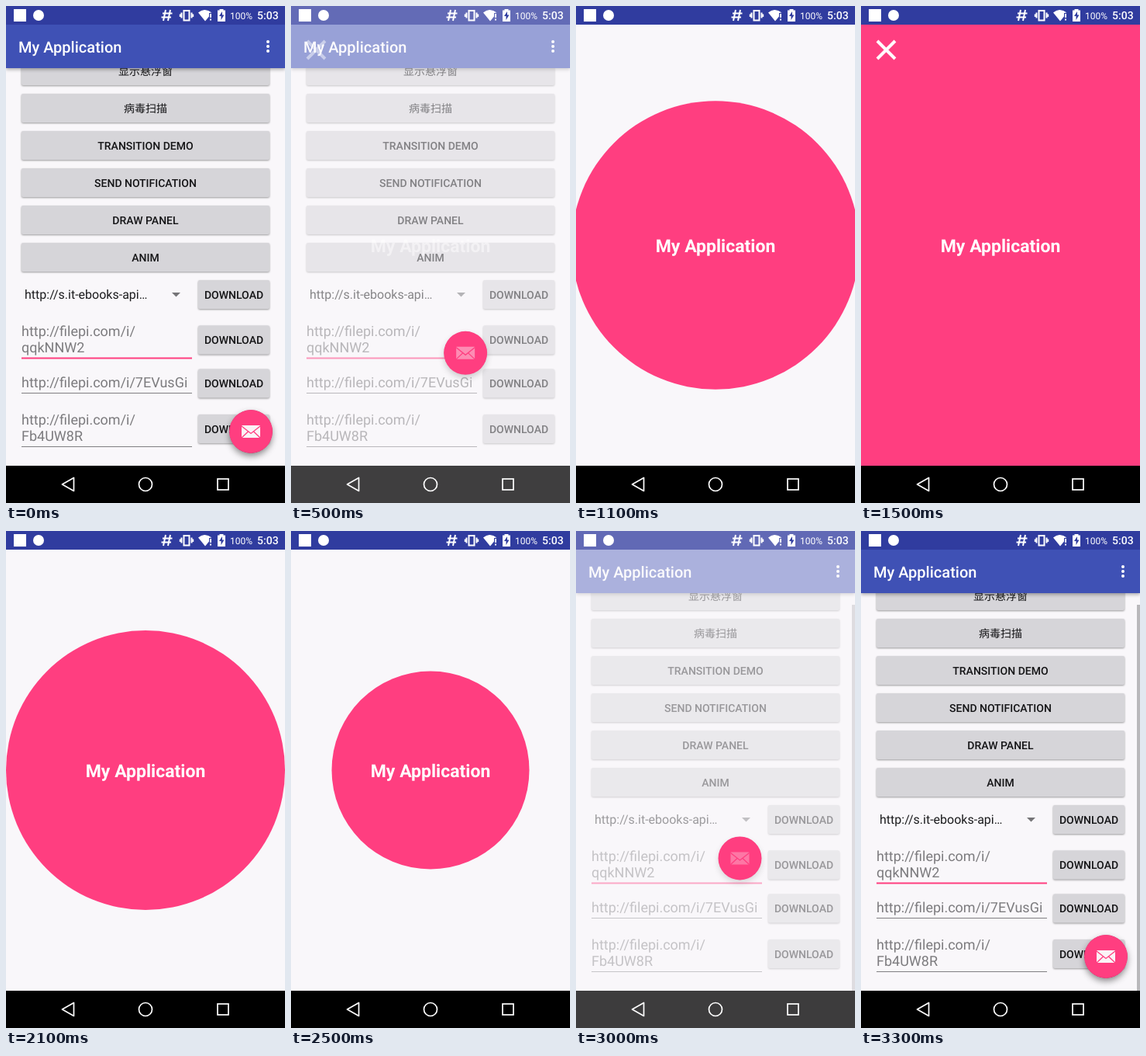
Recreate the animation shown at these times as an HTML page. Size 360 by 640 pixels, loop 3400 ms.

```html
<!DOCTYPE html>
<html lang="en">
<head>
<meta charset="utf-8">
<title>Floating button reveal</title>
<style>
  html, body { margin: 0; width: 100%; height: 100%; overflow: hidden; background: #f9f7fa; }
  svg { display: block; width: 360px; height: 640px; font-family: Roboto, "Noto Sans CJK SC", sans-serif; text-rendering: geometricPrecision; }
  .label { font-size: 14px; font-weight: 500; fill: #141416; text-anchor: middle; }
  .button { fill: #d6d5d9; filter: drop-shadow(0 1px 1px rgba(0, 0, 0, .38)); }
  .hint { font-size: 18px; fill: #7c7b7e; }
  .heading { font-size: 23px; font-weight: 700; fill: #fff; text-anchor: middle; }
  .cross { stroke: #fff; stroke-width: 4; }
  .paper { fill: #f9f7fa; }
  .pink { fill: #ff3e80; }
  .bar { fill: #3f51b5; filter: drop-shadow(0 2px 2px rgba(0, 0, 0, .3)); }
  #shadow { fill: #000; filter: drop-shadow(0 4px 4px rgba(0, 0, 0, .45)); }
  .line { fill: none; stroke: #fff; }
</style>
</head>
<body>
<svg viewBox="0 0 360 640">
  <defs>
    <clipPath id="reveal"><circle id="revealCircle" cx="180" cy="308"/></clipPath>
    <path id="arc" d="M316 548C248 507 180 387 180 308"/>
  </defs>
  <rect class="paper" width="360" height="640"/>

  <g id="home">
    <g id="list"></g>
    <text x="24" y="377" font-size="16" fill="#1c1c1e">http://s.it-ebooks-api…</text>
    <path d="M214 369h11l-5.500 5.500z" fill="#757477"/>
    <text class="hint"><tspan x="20" y="425">http://filepi.com/i/</tspan><tspan x="20" y="446">qqkNNW2</tspan></text>
    <text class="hint" x="20" y="491">http://filepi.com/i/7EVusGi</text>
    <text class="hint"><tspan x="20" y="539">http://filepi.com/i/</tspan><tspan x="20" y="560">Fb4UW8R</tspan></text>
    <rect class="pink" x="20" y="452.500" width="220" height="2"/>
    <path d="M20 498.500h220M20 567.500h220" stroke="#807f82"/>
    <rect id="scrollbar" x="356" y="95" width="4" height="497" fill="#b9b8bb"/>
    <rect class="bar" y="24" width="360" height="56"/>
    <text x="16" y="60" font-size="20" font-weight="500" fill="#fff">My Application</text>
    <g fill="#fff"><circle cx="338" cy="46" r="2"/><circle cx="338" cy="52" r="2"/><circle cx="338" cy="58" r="2"/></g>
  </g>

  <g id="ghost">
    <text class="heading" x="180" y="317">My Application</text>
    <path class="cross" d="M21 45l23 23M44 45l-23 23"/>
  </g>

  <g id="fab">
    <circle id="shadow" r="27.500"/>
    <circle class="pink" r="28"/>
    <g id="mail">
      <rect x="-12" y="-8" width="24" height="16" rx="1" fill="#fbf3f6"/>
      <path d="M-12-7L0 2.500 12-7M-12 8l8.500-8M12 8L3.500 0" class="line" style="stroke:#ff3e80" stroke-width="1.300"/>
    </g>
  </g>

  <g id="panel" clip-path="url(#reveal)">
    <rect class="pink" y="24" width="360" height="568"/>
    <text class="heading" x="180" y="317">My Application</text>
    <path id="close" class="cross" d="M21 45l23 23M44 45l-23 23"/>
  </g>

  <rect width="360" height="24" fill="#303c9f"/>
  <rect y="592" width="360" height="48"/>
  <g id="systemVeil" class="paper">
    <rect width="360" height="24"/>
    <rect y="592" width="360" height="48"/>
  </g>

  <g fill="#fff">
    <rect x="10" y="4" width="16" height="16"/>
    <circle cx="42" cy="12" r="7"/>
    <path class="line" stroke-width="2" d="M206 5l-3 14M212 5l-3 14M202 9.500h12.500M200.500 14.500h12.500"/>
    <path class="line" stroke-width="2" d="M229.500 6h7v12.500h-7zM226.500 8.500v7M239.500 8.500v7M224.800 10.500v3.500M241.200 10.500v3.500"/>
    <path d="M248 8.500Q256.500 1.500 265.500 8.500L262 9v4.500L257 19.500z"/>
    <path d="M263 10h2v5h-2zM263 16.500h2v2h-2z"/>
    <path d="M275.500 5.500V4h5v1.500h2.500V20H273V5.500z"/>
    <path d="M279 7l-4 6h2.500v5l4-6.500H279z" fill="#303c9f"/>
    <text x="289" y="17" font-size="12">100%</text>
    <text x="324" y="17" font-size="14" font-weight="500">5:03</text>
  </g>
  <g class="line" stroke-width="1.700">
    <path d="M72.500 616l15-8.500v17z" stroke-linejoin="round"/>
    <circle cx="180" cy="616" r="8.500"/>
    <rect x="273" y="609" width="14" height="14"/>
  </g>
</svg>
<script>
const LOOP = 3400, STEP = 100;
const FAB_RADIUS = 28, FULL_RADIUS = Math.hypot(360, 568);
const el = id => document.getElementById(id);
const [home, list, scrollbar, ghost, fab, shadow, mail, panel, closeIcon, revealCircle, arc, systemVeil] =
  ['home', 'list', 'scrollbar', 'ghost', 'fab', 'shadow', 'mail', 'panel', 'close', 'revealCircle', 'arc', 'systemVeil'].map(el);
const arcLength = arc.getTotalLength();

const button = (label, x, width, center) =>
  `<rect class="button" x="${x}" y="${center - 18.5}" width="${width}" height="37" rx="2"/>
   <text class="label" x="${x + width / 2}" y="${center + 5}">${label}</text>`;

list.innerHTML =
  ['显示悬浮窗', '病毒扫描', 'TRANSITION DEMO', 'SEND NOTIFICATION', 'DRAW PANEL', 'ANIM']
    .map((label, i) => button(label, 20, 320, 83.5 + 48 * i)).join('') +
  [371.5, 430, 486, 544.5].map(y => button('DOWNLOAD', 248, 92, y)).join('');

const progress = (t, start, duration) => Math.min(1, Math.max(0, (t - start) / duration));
const mix = (a, b, k) => a + (b - a) * k;
const easeInOut = k => (1 - Math.cos(Math.PI * k)) / 2;

// cubic-bezier(.4, 0, .2, 1)
function fastOutSlowIn(x) {
  let low = 0, high = 1, s = x;
  for (let i = 0; i < 24; i++) {
    s = (low + high) / 2;
    const at = 1.2 * s * (1 - s) ** 2 + 0.6 * s * s * (1 - s) + s ** 3;
    if (at < x) low = s; else high = s;
  }
  return s * s * (3 - 2 * s);
}

const opacity = (node, value) => node.setAttribute('opacity', value);
const show = (node, visible) => node.setAttribute('display', visible ? 'inline' : 'none');

function draw(t) {
  const returning = t >= 2100;
  const away = returning
    ? 1 - fastOutSlowIn(progress(t, 2860, 440))
    : fastOutSlowIn(progress(t, 260, 700));
  const open = t >= 960 && t < 2860;
  const radius = returning
    ? mix(180, FAB_RADIUS, easeInOut(progress(t, 2260, 600)))
    : mix(FAB_RADIUS, FULL_RADIUS, easeInOut(progress(t, 960, 425)));
  const detail = Math.max(0, 1 - away / 0.85);

  opacity(home, 1 - away);
  opacity(systemVeil, away * (1 - away));
  show(scrollbar, returning);

  opacity(ghost, away);
  show(ghost, !returning && !open);

  const point = arc.getPointAtLength(away * arcLength);
  fab.setAttribute('transform', `translate(${point.x} ${point.y})`);
  opacity(shadow, detail);
  opacity(mail, detail);
  show(fab, !open);

  revealCircle.setAttribute('r', radius);
  opacity(closeIcon, progress(t, 1150, 350));
  show(panel, open);
}

function frame(now) {
  draw(Math.floor(now % LOOP / STEP) * STEP);
  requestAnimationFrame(frame);
}
frame(performance.now());
</script>
</body>
</html>
```
